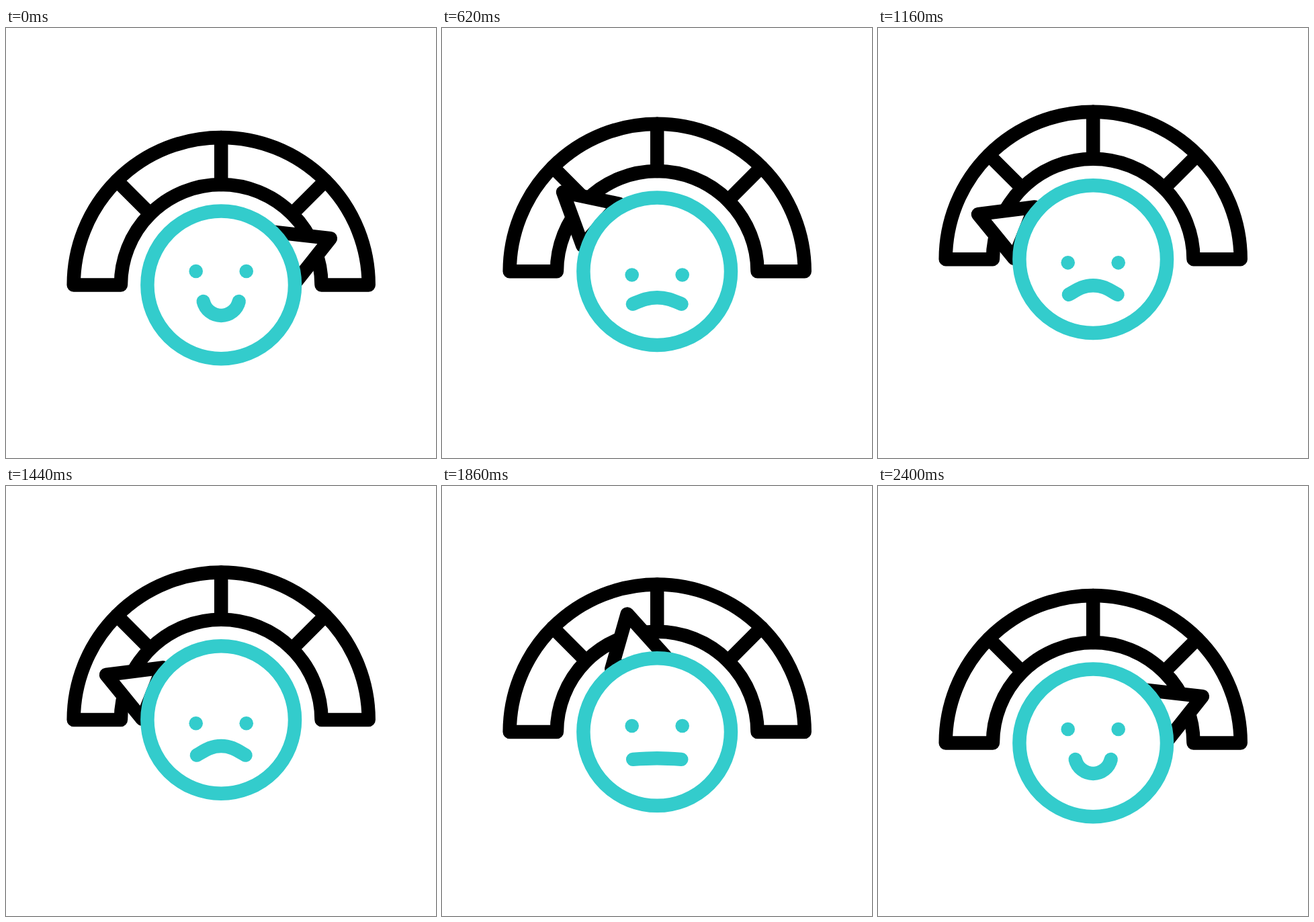
Recreate the animation shown at these times as an HTML page. Size 640 px wide and 640 px high, loop 2.42 s.

```html
<!DOCTYPE html>
<html lang="en">
<head>
<meta charset="utf-8">
<title>Mood gauge</title>
<style>
  html, body { margin: 0; width: 100%; height: 100%; overflow: hidden; background: #fff; }
  svg { display: block; width: 100%; height: 100%; }
  .line { fill: none; stroke: #000; stroke-width: 20.5; stroke-linecap: round; stroke-linejoin: round; }
  .solid { fill: #fff; }
  .teal { stroke: #3cc; }
  .eye { fill: #3cc; }
</style>
</head>
<body>
<svg viewBox="0 0 640 640">
  <g id="gauge">
    <path class="line" d="M-219.5 0A219.5 219.5 0 0 1 219.5 0H149.3A149.3 149.3 0 0 0 -149.3 0Z"/>
    <path class="line" d="M0 -219.5V-149.3M-155.2 -155.2L-105.6 -105.6M155.2 -155.2L105.6 -105.6"/>
    <path class="line solid" id="needle" d="M180.3 0L106 -41.2V41.2Z"/>
    <circle class="line solid teal" r="109.8"/>
    <g id="eyes">
      <circle class="eye" cx="-37.5" r="10.3"/>
      <circle class="eye" cx="37.5" r="10.3"/>
    </g>
    <path class="line teal" id="mouth"/>
  </g>
</svg>
<script>
const LOOP = 2420, STEP = 20;
const $ = id => document.getElementById(id);
const gauge = $('gauge'), needle = $('needle'), eyes = $('eyes'), mouth = $('mouth');

// Keys are [time in ms, value]
const LIFT = [[0, 382.4], [1200, 344], [2400, 382.4]];
const MOOD = [[0, 0], [480, 1], [800, 0.654], [1120, 1], [1440, 1], [2400, 0]];
const GAZE = [[0, -20.4], [480, 5.2], [1440, 5.2], [2220, -20.4]];

// Half width, end y, middle y, end handle x and y, middle handle
const SMILE = [26.5, 24.6, 45.5, 2.9, 12.3, 12.7];
const FLAT = [36, 37.8, 39.3, 12, 0.8, 13];
const FROWN = [36.3, 52.6, 39, 13, -7.5, 15];
const FLAT_AT = 0.49;

const mix = (a, b, k) => a + (b - a) * k;
const ease = x => x * x * (3 - 2 * x);

function at(keys, t) {
  const i = keys.findIndex(k => k[0] > t);
  if (i < 0) return keys[keys.length - 1][1];
  const [t0, a] = keys[i - 1], [t1, b] = keys[i];
  return mix(a, b, ease((t - t0) / (t1 - t0)));
}

function mouthPath(mood) {
  const sad = mood > FLAT_AT;
  const from = sad ? FLAT : SMILE, to = sad ? FROWN : FLAT;
  const k = sad ? (mood - FLAT_AT) / (1 - FLAT_AT) : mood / FLAT_AT;
  const [w, end, mid, hx, hy, m] = from.map((v, i) => mix(v, to[i], k));
  return `M${-w} ${end}C${hx - w} ${end + hy} ${-m} ${mid} 0 ${mid}` +
    `C${m} ${mid} ${w - hx} ${end + hy} ${w} ${end}`;
}

function draw(now) {
  const t = Math.floor((now % LOOP) / STEP) * STEP;
  const mood = at(MOOD, t);
  gauge.setAttribute('transform', `translate(320.2 ${at(LIFT, t)})`);
  needle.setAttribute('transform', `translate(-3.8 0) rotate(${-mix(22.6, 158.2, mood)})`);
  eyes.setAttribute('transform', `translate(0 ${at(GAZE, t)})`);
  mouth.setAttribute('d', mouthPath(mood));
}

function tick() {
  draw(performance.now());
  requestAnimationFrame(tick);
}
tick();
</script>
</body>
</html>
```
